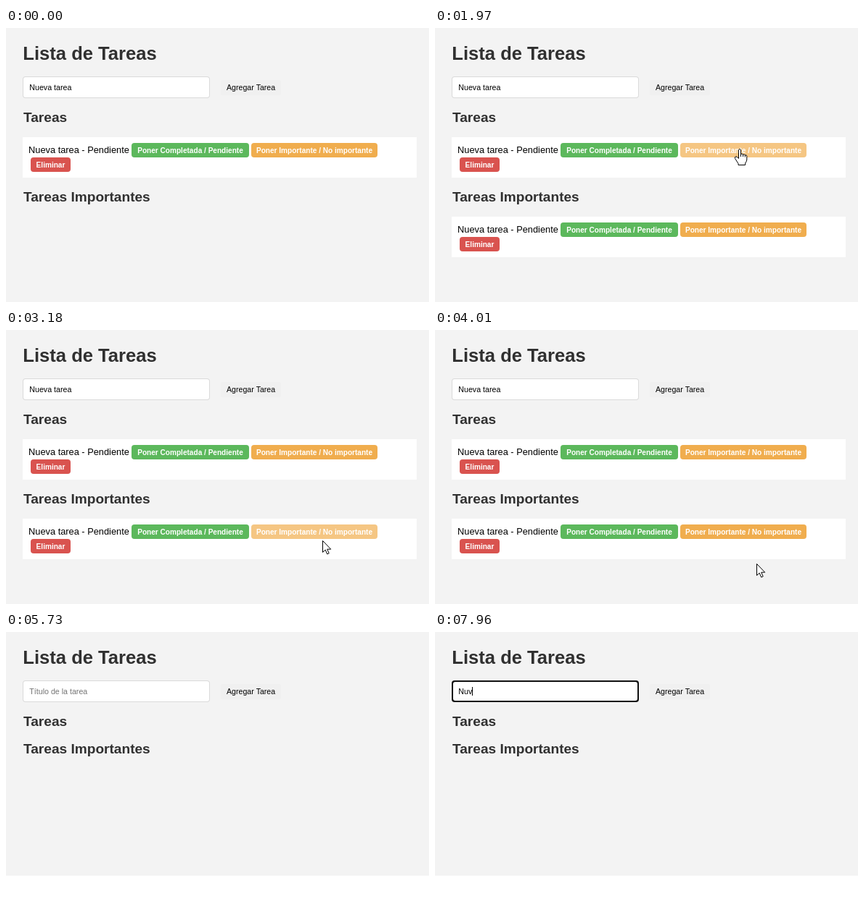
Recreate the animation shown at these times as an HTML page with a canvas. Size 583 by 379 pixels, loop 8000 ms.

```html
<!DOCTYPE html>
<html lang="es">
<head>
<meta charset="utf-8">
<title>Lista de Tareas</title>
<style>
html, body { margin: 0; width: 100%; height: 100%; overflow: hidden; background: #f3f3f3; }
canvas { display: block; width: 583px; height: 379px; }
</style>
</head>
<body>
<canvas id="stage" width="583" height="379"></canvas>
<script>
const ctx = document.getElementById('stage').getContext('2d');
const LOOP = 8000;
const ADDED = 1970, CLEARED = 5730, FOCUSED = 6690, TYPING = 7520, KEY_GAP = 220, BLINK = 510;
const FAMILY = '"Liberation Sans", Arial, sans-serif';
const HEADING = '#303030';

const easeIn = p => p * p;
const easeOut = p => 1 - (1 - p) ** 1.37;
const easeInOut = p => p * p * (3 - 2 * p);

const point = (x, y) => ({ x, y });
const important = point(420, 167), below = point(436, 291), rest = point(443, 323);
const field = point(262, 76);

// Each move follows a quadratic curve; without `bend` it is straight.
const moves = [
  { start: 130, end: 1260, from: point(538, 372), bend: point(495, 273), to: important, ease: easeOut },
  { start: 2430, end: 3180, from: important, to: below, ease: easeInOut },
  { start: 3280, end: 4010, from: below, to: rest, ease: easeOut },
  { start: 4550, end: 4880, from: rest, to: point(478, 379), ease: easeIn, leaves: true },
  { start: 5790, end: 6480, from: point(542, 318), bend: point(370, 110), to: field, ease: easeOut },
  { start: 6550, end: 6820, from: field, to: point(294, 0), ease: easeIn, leaves: true }
];

function pointerAt(t) {
  const move = moves.findLast(m => t >= m.start);
  if (!move || move.leaves && t >= move.end) return null;
  const { start, end, from, to, ease } = move;
  const bend = move.bend || point((from.x + to.x) / 2, (from.y + to.y) / 2);
  const p = ease(Math.min(1, (t - start) / (end - start))), q = 1 - p;
  const curve = axis => Math.round(q * q * from[axis] + 2 * p * q * bend[axis] + p * p * to[axis]);
  return point(curve('x'), curve('y'));
}

function box(x, y, w, h, radius, color) {
  ctx.fillStyle = color;
  ctx.beginPath();
  ctx.roundRect(x, y, w, h, radius);
  ctx.fill();
}

function text(str, x, y, size, color, bold = false, align = 'left') {
  ctx.font = `${bold ? 'bold ' : ''}${size}px ${FAMILY}`;
  ctx.textAlign = align;
  ctx.fillStyle = color;
  ctx.fillText(str, x, y);
}

function button(label, x, y, w, color) {
  box(x, y, w, 20, 4, color);
  text(label, x + w / 2, y + 14, 10.08, '#fff', true, 'center');
}

const within = (p, x, y, w, h) => p && p.x >= x && p.x < x + w && p.y >= y && p.y < y + h;

function task(y, pointer) {
  box(23, y, 543, 56, 0, '#fff');
  text('Nueva tarea - Pendiente', 31.1, y + 22, 12.8, '#000');
  button('Poner Completada / Pendiente', 173, y + 8, 162, '#5cb85c');
  // The highlight lasts a moment past the lower edge.
  const hover = within(pointer, 338, y + 8, 174, 23);
  button('Poner Importante / No importante', 338, y + 8, 174, hover ? '#f5c683' : '#f0ad4e');
  button('Eliminar', 34, y + 28, 55, '#d9534f');
}

function typed(t) {
  if (t < CLEARED) return 'Nueva tarea';
  return 'Nueva tarea'.replace('ev', 'v').slice(0, Math.max(0, Math.floor((t - TYPING) / KEY_GAP) + 1));
}

function input(t) {
  const focused = t >= FOCUSED;
  const edge = focused ? 2 : 1;
  box(23, 67, 258, 30, 4, focused ? '#101010' : '#dadada');
  box(23 + edge, 67 + edge, 258 - 2 * edge, 30 - 2 * edge, 3, '#fff');
  const value = typed(t);
  text(value || 'Título de la tarea', 32.3, 86, 10.667, value ? '#000' : '#757575');
  if (focused && (t < FOCUSED + BLINK || t >= TYPING)) {
    box(Math.round(32 + (value && ctx.measureText(value).width)), 76, 1, 12, 0, '#000');
  }
}

const shapes = {
  arrow: new Path2D('M.5 .5V16.5L4.2 13.1L6.7 19L9.2 17.9L6.7 12.2H11.7Z'),
  hand: new Path2D('M-1.5 1.5Q0 -.8 1.5 1.5V7.5Q3 6 4.5 8Q6 7 7.3 8.8Q9.5 8 9.8 10.5V15' +
    'Q9.5 18 7.6 20V22.5H-2V20.5L-6.5 13.5Q-7.3 11 -5 10.8Q-3.4 11 -1.5 13.5Z'),
  folds: new Path2D('M1.5 7V11M4.5 8V11M7.3 9V11.5'),
  beam: new Path2D('M-3 -7.5H3M0 -7V7M-3 7.5H3')
};

function drawPointer(p, t) {
  const overButton = within(p, 338, 159, 174, 20) ||
    t >= ADDED && t < CLEARED && within(p, 338, 269, 174, 20);
  ctx.save();
  ctx.translate(p.x, p.y);
  ctx.lineWidth = 1;
  ctx.strokeStyle = '#000';
  ctx.fillStyle = '#fff';
  if (within(p, 23, 67, 258, 30)) {
    ctx.translate(0.5, 0);
    ctx.stroke(shapes.beam);
  } else {
    const shape = overButton ? shapes.hand : shapes.arrow;
    ctx.fill(shape);
    ctx.stroke(shape);
    if (overButton) ctx.stroke(shapes.folds);
  }
  ctx.restore();
}

function draw(t) {
  const cleared = t >= CLEARED;
  const pointer = pointerAt(t);
  box(0, 0, 583, 379, 0, '#f3f3f3');
  if (cleared) box(0, 337, 583, 42, 0, '#fff');

  text('Lista de Tareas', 23.3, 44, 25.6, HEADING, true);
  input(t);
  box(296, 72, 83, 21, 2, '#f0f0f0');
  text('Agregar Tarea', 304, 86, 10.6, '#000');

  text('Tareas', 24, 130, 19.1, HEADING, true);
  text('Tareas Importantes', 24, cleared ? 168 : 240, 19.1, HEADING, true);
  if (!cleared) task(151, pointer);
  if (!cleared && t >= ADDED) task(261, pointer);
  if (pointer) drawPointer(pointer, t);
}

const start = performance.now();
function tick() {
  draw((performance.now() - start) % LOOP);
  requestAnimationFrame(tick);
}
tick();
</script>
</body>
</html>
```
